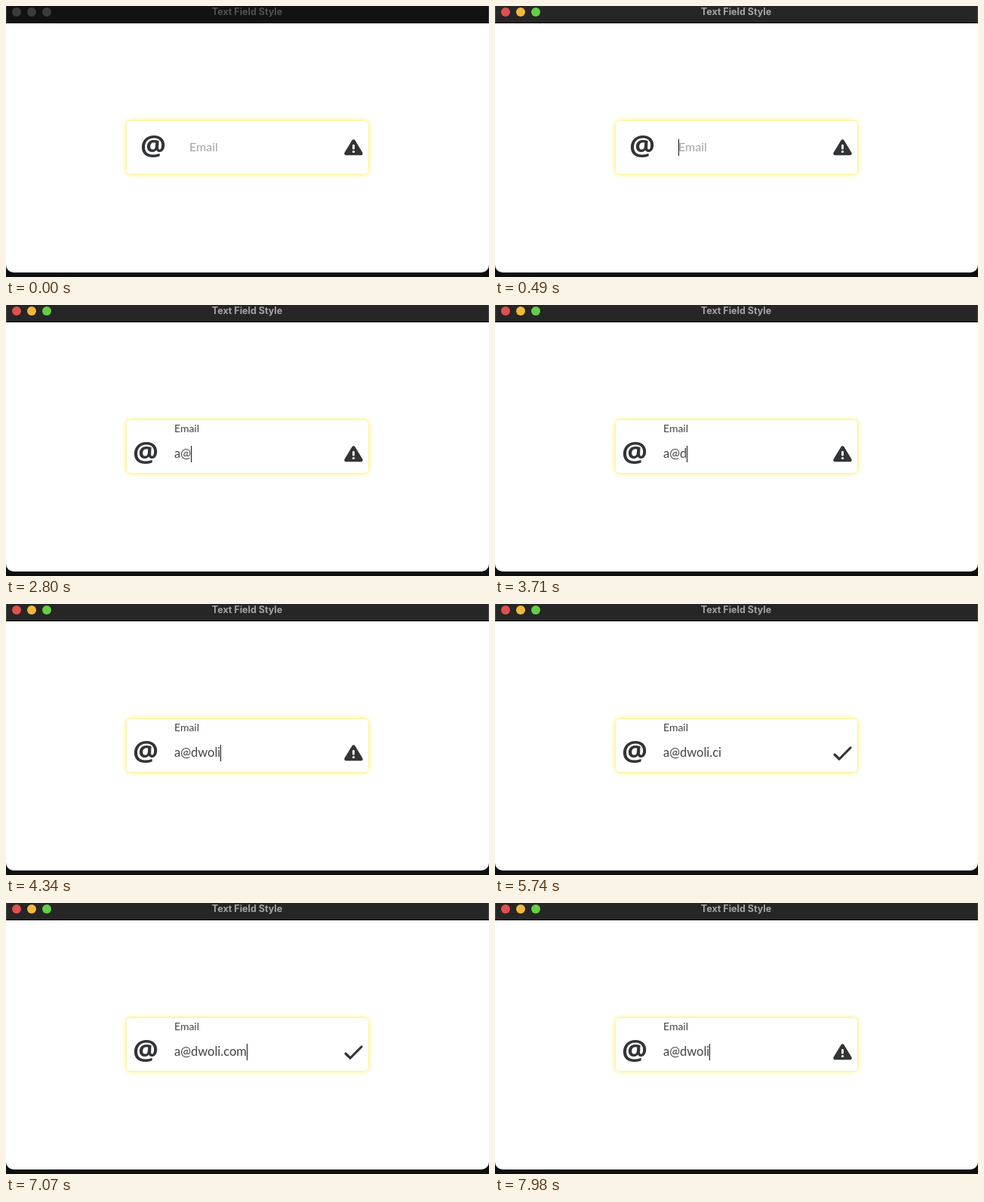
These frames come from a looping animation (640 by 360 pixels, 8 s). An HTML page with a canvas:

```html
<!DOCTYPE html>
<html lang="en">
<head>
<meta charset="utf-8">
<title>Text Field Style</title>
<style>
  html, body { margin: 0; width: 100%; height: 100%; overflow: hidden; background: #0d0f11; }
  canvas { display: block; }
</style>
</head>
<body>
<canvas id="stage" width="640" height="360"></canvas>
<script>
const ctx = document.getElementById('stage').getContext('2d');
const LOOP = 8000;
const FOCUS = 490;
const INK = '#333436';

// [time, typed text, caret visible]
const steps = [
  [0, '', false],
  [FOCUS, '', true],
  [980, '', false],
  [1540, '', true],
  [2030, 'a', true],
  [2800, 'a@', true],
  [3290, 'a@', false],
  [3640, 'a@d', true],
  [3850, 'a@dw', true],
  [4060, 'a@dwo', true],
  [4130, 'a@dwol', true],
  [4340, 'a@dwoli', true],
  [4550, 'a@dwoli.', true],
  [4970, 'a@dwoli.c', true],
  [5250, 'a@dwoli.ci', true],
  [5740, 'a@dwoli.ci', false],
  [6090, 'a@dwoli.c', true],
  [6510, 'a@dwoli.co', true],
  [6720, 'a@dwoli.com', true],
  [7280, 'a@dwoli.co', true],
  [7630, 'a@dwoli.c', true],
  [7770, 'a@dwoli.', true],
  [7910, 'a@dwoli', true]
];

const isValid = text => /^\w+@\w+\.\w{2,}$/.test(text);

function label(text, x, y, font, color, align = 'left') {
  ctx.font = font;
  ctx.fillStyle = color;
  ctx.textAlign = align;
  ctx.fillText(text, x, y);
}

function roundRect(x, y, w, h, radii, color) {
  ctx.beginPath();
  ctx.roundRect(x, y, w, h, radii);
  ctx.fillStyle = color;
  ctx.fill();
}

function dot(x, y, r, color) {
  ctx.beginPath();
  ctx.arc(x, y, r, 0, Math.PI * 2);
  ctx.fillStyle = color;
  ctx.fill();
}

function drawWindow(active) {
  ctx.fillStyle = '#0d0f11';
  ctx.fillRect(0, 0, 640, 360);
  roundRect(0, 0, 640, 354, [0, 0, 10, 10], '#fff');
  ctx.fillStyle = active ? '#262626' : '#121212';
  ctx.fillRect(0, 0, 640, 22);
  ctx.fillStyle = active ? '#4a4a4a' : '#3a3a3a';
  ctx.fillRect(0, 0, 1, 22);
  ctx.fillRect(639, 0, 1, 22);
  ctx.fillStyle = '#000';
  ctx.fillRect(0, 22, 640, 1);

  const lights = active ? ['#e0504f', '#f0b93c', '#65ce47'] : Array(3).fill('#3b3b3b');
  lights.forEach((color, i) => dot(14 + i * 20, 8, 6, color));
  label('Text Field Style', 319.5, 12, 'bold 12.5px Inter, sans-serif',
    active ? '#a5a5a5' : '#515151', 'center');
}

function drawField() {
  ctx.save();
  ctx.shadowColor = '#f8e634';
  ctx.shadowBlur = 7;
  roundRect(160, 153, 320, 70, 5, '#fff');
  ctx.restore();
}

function drawWarning(y) {
  ctx.beginPath();
  ctx.moveTo(460.5, y + 2.5);
  ctx.lineTo(470.5, y + 19);
  ctx.lineTo(450.5, y + 19);
  ctx.closePath();
  ctx.lineJoin = 'round';
  ctx.lineWidth = 4.5;
  ctx.strokeStyle = ctx.fillStyle = INK;
  ctx.stroke();
  ctx.fill();
  roundRect(459.1, y + 7, 2.8, 6.5, 1, '#fff');
  dot(460.5, y + 16.5, 1.6, '#fff');
}

function drawCheck() {
  ctx.beginPath();
  ctx.moveTo(450, 200);
  ctx.lineTo(456.2, 206);
  ctx.lineTo(471, 191);
  ctx.lineWidth = 3.2;
  ctx.lineCap = 'round';
  ctx.lineJoin = 'round';
  ctx.strokeStyle = INK;
  ctx.stroke();
}

function drawCaret(x, y) {
  ctx.fillStyle = '#111';
  ctx.fillRect(x, y, 1, 22);
}

function render(t) {
  const [, text, caret] = steps.findLast(step => step[0] <= t);
  const filled = text !== '';
  const drop = filled ? 10 : 0;

  drawWindow(t >= FOCUS);
  drawField();
  label('@', 178.1 - drop, 199 + drop, 'bold 38px "Open Sans", sans-serif', INK);

  if (filled) {
    label('Email', 223, 169, '14px Lato, sans-serif', '#444');
    label(text, 223, 203, '16.5px Lato, sans-serif', '#444');
  } else {
    label('Email', 243, 193, '16px Lato, sans-serif', '#a3a3a3');
  }

  if (caret) {
    const x = filled ? Math.round(223 + ctx.measureText(text).width) : 243;
    drawCaret(x, 177 + drop);
  }

  if (isValid(text)) drawCheck();
  else drawWarning(177 + drop);
}

const start = performance.now();
function tick() {
  render((performance.now() - start) % LOOP);
  requestAnimationFrame(tick);
}
tick();
</script>
</body>
</html>
```
